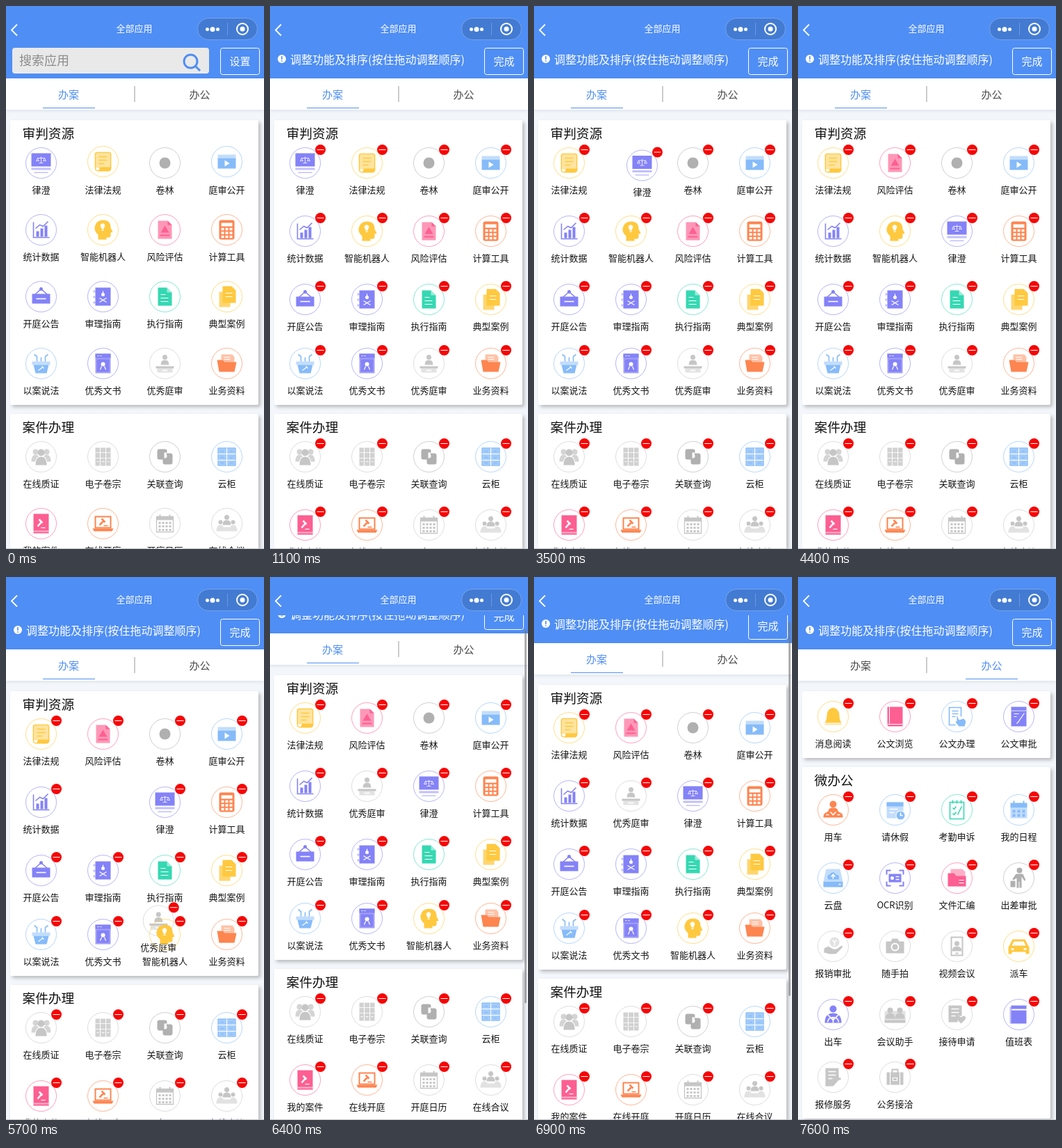
An HTML page that plays this animation: 371x780 px, repeating every 8000 ms.

```html
<!DOCTYPE html>
<html lang="zh-CN">
<head>
<meta charset="utf-8">
<title>全部应用</title>
<style>
html, body { margin: 0; width: 100%; height: 100%; overflow: hidden; background: #f3f6fa; }
svg { display: block; }
text { font-family: "Noto Sans CJK SC", "Noto Sans CJK", sans-serif; }
.mid { text-anchor: middle; }
.card { fill: #fff; filter: drop-shadow(3px 3px 2.5px rgba(0, 0, 0, .24)); }
.head { font-size: 18.7px; fill: #111; }
.label { font-size: 13px; fill: #161616; text-anchor: middle; }
.tab { font-size: 15px; fill: #4a4a4a; text-anchor: middle; }
.tab.on { fill: #4f8ef4; }
.icon { fill: currentColor; }
.ring { fill: none; stroke: currentColor; stroke-opacity: .6; }
.l { opacity: .5; }
.w, .s { fill: none; stroke: #fff; stroke-width: 1.6; }
.s { stroke: currentColor; }
.f { fill: #fff; }
.white { fill: #fff; }
</style>
</head>
<body>
<svg id="stage" width="371" height="780" viewBox="0 0 371 780">
<defs>
  <g id="badge"><circle r="7.5" fill="#f60505"/><path class="w" d="M-5 0h10" style="stroke-width:1"/></g>

  <g id="screen"><path d="M-14-14h28v19h-28z"/><path class="l" d="M-14 7h28v3h-28zM-10 13h20v1.5h-20z"/><path class="w" style="stroke-width:.8" d="M0-9v9M-5-7h10M-7-3l2-4 2 4zM3-3l2-4 2 4zM-3 0h6"/></g>
  <g id="scroll"><path class="l" d="M-12-11q0-3 3-3h18q3 0 3 3v20h-24z"/><path class="s" style="stroke-width:1.2" d="M-11-10q0-3 3-3h16q3 0 3 3v20q0 3-3 3h-16q-3 0-3-3z"/><path d="M-5 8h17q0 6-5 6h-15q3-1 3-6z"/><path class="s" d="M-6-7h12M-6-2h12M-6 3h8"/></g>
  <g id="disc"><circle r="8"/></g>
  <g id="play"><path class="l" d="M-13-10h26v5h-26z"/><path d="M-13-5h26v15h-26z"/><path class="f" d="M-3-2l7 4.500-7 4.500z"/></g>
  <g id="chart"><path d="M-7 2h4v8h-4zM-1-2h4v12h-4zM5-6h4v16h-4z"/><path class="s" d="M-11-11v22h23M-8-2l6-5 5 2 7-7"/></g>
  <g id="brain"><path d="M-7 14v-7q-6-5-5-11 2-10 12-10 11 0 11 11l3 6-3 1v4q0 3-3 3h-3v3z"/><path class="f" d="M-3-4a3.200 3.200 0 1 1 5 0l-1 3h-3zM-2 0h3v1.500h-3z"/></g>
  <g id="risk"><path class="l" style="opacity:.65" d="M-10-13h14l6 6v20h-20z"/><path d="M0-6l6 10h-12zM-7 7h14v2h-14zM4-13l6 6h-6z"/></g>
  <g id="calc"><path d="M-11-11q0-3 3-3h16q3 0 3 3v22q0 3-3 3h-16q-3 0-3-3z"/><path class="f" d="M-8-10h16v5h-16z"/><path class="w" stroke-dasharray="4 2" style="stroke-width:3.500" d="M-8-1h16M-8 4.500h16M-8 10h16"/></g>
  <g id="sign"><path class="s" d="M-9-3l9-8 9 8"/><path d="M-13-4h26v14h-26z"/><circle cy="-11" r="2.500"/><path class="w" d="M-7 3h14"/></g>
  <g id="guide"><path d="M-11-13h22v26h-22z"/><path class="l" d="M-14-9h3v3h-3zM-14-1h3v3h-3zM-14 7h3v3h-3z"/><path class="w" style="stroke-width:1.200" d="M-5 8l10-6M5 8l-10-6M0-8v7"/><circle class="f" cy="-3" r="2.500"/></g>
  <g id="paper"><path d="M-10-13h13l7 7v19h-20z"/><path class="l f" d="M3-13l7 7h-7z"/><path class="w" style="stroke-width:1.200" d="M-6-3h7M-6 2h11M-6 7h11"/></g>
  <g id="papers"><path class="l" style="opacity:.75" d="M-11-7h16v22h-16z"/><path d="M-6-15h13l6 6v18h-19z"/><path class="w" style="stroke-width:1.200" d="M-2-5h10M-2 0h10"/></g>
  <g id="podium"><path class="l" d="M-13-3h26v5h-26z"/><path d="M-11 2h22l-3 12h-16z"/><path class="s" d="M-6-3v-7l-4-3M6-3v-7l4-3M0-3v-6"/><path class="w" style="stroke-width:1.200" d="M-4 10l7-5M1 4l3 3"/></g>
  <g id="award"><path class="l" style="opacity:.75" d="M-11-14h22v28h-22z"/><path d="M-11-14h22v6h-22zM-9-6h18v18h-18z"/><circle class="f" cy="1" r="3"/><path class="w" style="stroke-width:1.200" d="M-8-11h2M-4-11h2M-2 4l-2 5M2 4l2 5"/></g>
  <g id="judge"><circle cy="-9" r="3.500"/><path d="M-6 2q0-7 6-7t6 7zM-13 4h26v3h-26z"/><path class="l" d="M-11 7h22v6h-22z"/><path class="w" d="M-4 10h8"/></g>
  <g id="folder"><path class="l" d="M-8-13h16l3 4v13h-19z"/><path d="M-14-5h8l3 3h17l-3 14h-22z"/><path class="w" style="stroke-width:1.200" d="M-4-9h9M-4-6h9"/></g>

  <g id="people"><g class="l" style="opacity:.75"><circle cx="-8" cy="-7" r="4"/><circle cx="8" cy="-7" r="4"/><path d="M-14 7q0-10 6-10t6 10zM2 7q0-10 6-10t6 10z"/></g><circle cy="-6" r="5"/><path class="f" d="M-9 12q0-13 9-13t9 13z"/><path d="M-8 12q0-12 8-12t8 12z"/></g>
  <g id="shelf"><path class="l" style="opacity:.8" d="M-11-13h6.500v26h-6.500zM-3.500-13h7v26h-7zM4.500-13h6.500v26h-6.500z"/><path class="w" d="M-11-6h22M-11 2h22" style="stroke-width:.8"/><path class="w" style="stroke-width:1" d="M-9 7h3M-2 7h4M6 7h3"/></g>
  <g id="link"><path d="M-8-11h8q3 0 3 3v9q0 3-3 3h-8q-3 0-3-3v-9q0-3 3-3z"/><path class="f" d="M-1-6h14v18h-14z"/><path d="M2-5h6q3 0 3 3v10q0 3-3 3h-8q-3 0-3-3v-6h3q3 0 3-3z"/></g>
  <g id="drawers"><path class="l" style="opacity:.75" d="M-13-13h26v26h-26z"/><path class="s" style="stroke-width:1" d="M-12.500-12.500h25v25h-25z"/><path class="w" style="stroke-width:1" d="M0-13v26M-13-4h26M-13 5h26"/><path class="s" d="M-9-8h5M4-8h5M-9 1h5M4 1h5M-9 9h5M4 9h5"/></g>
  <g id="case"><path d="M-11-14h22v28h-22z"/><path class="l f" d="M-11 10h22v2h-22z"/><path class="w" style="stroke-width:2.500" d="M-3-6l5 5M1-3l-6 7"/><path class="w" style="stroke-width:1.200" d="M0 6h6"/></g>
  <g id="laptop"><path class="s" style="stroke-width:2" d="M-11-10h22v16h-22z"/><path d="M-15 7h30l-2 4h-26z"/><path class="s" style="stroke-width:2.500" d="M-2-7l5 5M1-4l-6 6"/><path class="s" d="M1 3h6"/></g>
  <g id="calendar"><path class="s" style="stroke-width:1.300" d="M-12-10h24v22h-24z"/><path d="M-12-10h24v5h-24zM-8-13h2v5h-2zM6-13h2v5h-2z"/><path class="s" stroke-dasharray="3 2" style="stroke-width:3" d="M-9-1h18M-9 4h18M-9 9h18"/></g>
  <g id="meeting"><circle cy="-9" r="3.500"/><circle cx="-9" cy="-2" r="3"/><circle cx="9" cy="-2" r="3"/><path d="M-6 2q0-7 6-7t6 7z"/><path class="l" d="M-15 11q0-9 6-9 3 0 4 3h10q1-3 4-3 6 0 6 9z"/></g>

  <g id="bell"><path d="M-12 9q3-4 3-11 0-9 9-11 9 2 9 11 0 7 3 11z"/><path class="l" d="M-12 10h24v2h-24z"/></g>
  <g id="book"><path d="M-11-14h22v28h-20q-2 0-2-3z"/><path class="w" style="stroke-width:1" d="M-8-14v24M-11 11h22"/></g>
  <g id="handle"><path class="s" d="M6 0v-13h-17v25h9M-7-8h9M-7-4h9M-7 0h5"/><path d="M0-2l3 7 7-2 3 4-2 7h-8l-5-6 2-2z"/></g>
  <g id="approve"><path d="M-11-14h22v28h-22z"/><path class="l f" d="M-11-9h22v1.500h-22z"/><path class="w" style="stroke-width:1.200" d="M-7-4h7M-7 0h4M8-5l-9 13-2 2"/></g>
  <g id="driver"><circle cy="-8" r="5"/><path d="M-7 2q0-5 7-5t7 5l5 3q2 1 2 6h-28q0-5 2-6z"/><path class="w" d="M-10 7h4M6 7h4M-4 3l4 4 4-4"/></g>
  <g id="leave"><path class="l" d="M-12-11h24v23h-24z"/><path d="M-12-11h24v6h-24z"/><path class="w" d="M-8-1h12M-8 4h7"/><circle class="f" cx="8" cy="8" r="7"/><circle cx="8" cy="8" r="6"/><path class="w" d="M8 4v4h3"/></g>
  <g id="check"><path class="s" d="M-10-11h20v24h-20zM-6-14v5M0-14v5M6-14v5M-6-3l2 2 3-4M-6 5l2 2 3-4M7-5l-6 12"/></g>
  <g id="plan"><path class="l" d="M-12-3h24v15h-24z"/><path d="M-12-10h24v7h-24zM-8-13h2v5h-2zM6-13h2v5h-2z"/><path class="s" stroke-dasharray="4 3" style="stroke-width:4" d="M-9 2h18M-9 8h18"/></g>
  <g id="disk"><path class="l" d="M-10-13h20l4 18h-28z"/><path d="M-14 5h28v8h-28z"/><path d="M-7 2q-3-6 2-7 5-7 9 0 6 0 4 7z"/><path class="w" d="M0 1v-6M-3-2l3-3 3 3M8 9h3"/></g>
  <g id="scan"><path class="s" style="stroke-width:2" d="M-12-5v-6h6M6-11h6v6M12 5v6h-6M-6 11h-6v-6"/><path d="M-9-6h18v12h-18z"/><path class="w" d="M1-2h5M1 2h5"/><circle class="f" cx="-4" r="2.500"/></g>
  <g id="files"><path class="l" d="M-9-13h17l4 4v12h-21z"/><path d="M-13-7h9l3 4h14v15h-26z"/><path class="w" style="stroke-width:1.200" d="M3 3h7M3 7h7"/></g>
  <g id="trip"><circle cx="1" cy="-11" r="4"/><path d="M-4-6h10l4 9-2 1-4-6v16h-3v-9h-1v9h-3v-14l-5 3-1-2zM-12 4h7v9h-7z"/></g>
  <g id="pay"><circle class="l" cx="2" cy="-6" r="7"/><path d="M-13 3l6-3 7 4h5l7-5q3 1 0 4l-8 8h-9l-8-2z"/><path class="w" d="M-1-9l3 3 3-3M2-6v5"/></g>
  <g id="camera"><path d="M-13-7h7l2-4h8l2 4h7v17h-26z"/><circle class="f" cy="1" r="6"/><circle cy="1" r="4"/></g>
  <g id="phone"><path class="s" style="stroke-width:2" d="M-8-13h16v26h-16z"/><circle cy="-4" r="3.500"/><path d="M-7 7q0-7 7-7t7 7zM-2 9h4v2h-4z"/></g>
  <g id="car"><path d="M-9-10h18l4 8 2 3v10h-5v-3h-20v3h-5v-10l2-3z"/><path class="f" d="M-7-7h14l3 6h-20z"/><path class="w" style="stroke-width:2.500" d="M-11 4h4M7 4h4"/></g>
  <g id="wheel"><circle cy="-8" r="5"/><path d="M-12 12q0-14 12-14t12 14z"/><path class="w" d="M-8 11q1-7 8-7t8 7M0 4v8M-9-1l9 9 9-9"/></g>
  <g id="host"><path class="l" d="M-15-5h30v15h-30z"/><circle cx="-7" cy="-6" r="4"/><circle cx="7" cy="-6" r="4"/><path d="M-14 6q0-8 7-8t7 8q0-8 7-8t7 8zM-15 8h30v4h-30z"/></g>
  <g id="care"><path d="M-12-13h19v15h-6v9h-13z"/><path class="w" d="M-8-8h11M-8-3h11M-8 2h6"/><path d="M6 13l-6-6q-2-5 3-5l3 2 3-2q5 0 3 5z"/></g>
  <g id="duty"><path d="M-11-13h22v5h-22z"/><path class="l" d="M-13-11h3v24h-3z"/><path d="M-11-6h22v19h-22z"/></g>
  <g id="repair"><path d="M-11-13h19v14l-9 12h-10z"/><path class="w" d="M-7-8h11M-7-3h11M-7 2h6"/><path class="s" style="stroke-width:3" d="M-1 12l8-9 4-1M7 3l0-4"/></g>
  <g id="bag"><path class="s" style="stroke-width:2" d="M-4-6v-5h8v5"/><path d="M-12-7h24v18h-24z"/><path class="w" style="stroke-width:1.200" d="M-7-7v18M7-7v18M-3 5v-4h6v4z"/></g>
</defs>

<rect width="371" height="780" fill="#f3f6fa"/>
<g id="page">
  <rect y="-10" width="371" height="114" fill="#4f8ef4"/>
  <g id="search">
    <rect x="9" y="60" width="283" height="37" rx="4" fill="#e9e9ea"/>
    <text x="19" y="85" font-size="18" fill="#8c8c8c">搜索应用</text>
    <g fill="none" stroke="#4f8ef4" stroke-width="3"><circle cx="265.500" cy="79.500" r="9.500"/><path d="M272 86l7 7"/></g>
  </g>
  <g id="hint">
    <circle cx="17" cy="76" r="6" class="white"/>
    <path d="M16.200 72h1.600v5h-1.600zM16.200 78.200h1.600v1.600h-1.600z" fill="#4f8ef4"/>
    <text x="29" y="83" font-size="16" font-weight="500" class="white">调整功能及排序(按住拖动调整顺序)</text>
  </g>
  <rect x="308.500" y="60.500" width="56" height="38" rx="3" fill="none" stroke="#fff"/>
  <text id="action" class="white mid" x="336.500" y="85" font-size="15"></text>
  <rect y="104" width="371" height="45" fill="#fff" style="filter:drop-shadow(0 2px 2px rgba(60,80,120,.1))"/>
  <path d="M185 115v23" stroke="#bbb" stroke-width="1.500"/>
  <text class="tab" x="90" y="132.500">办案</text>
  <text class="tab" x="278.500" y="132.500">办公</text>
  <path id="line" d="M53 146.500h75" stroke="#4f8ef4"/>
  <g id="cases"></g>
  <g id="office"></g>
</g>

<rect width="371" height="55" fill="#4f8ef4"/>
<path d="M16 26.500l-8 8 8 8" fill="none" stroke="#fff" stroke-width="1.800"/>
<text class="white mid" x="184.500" y="37" font-size="13" font-weight="500">全部应用</text>
<rect x="275.500" y="17.500" width="86" height="31" rx="15.500" fill="#437bd2" stroke="#75a3ec"/>
<path d="M318.500 24v18" stroke="#6d99e0"/>
<g class="white"><circle cx="289.500" cy="33.500" r="2.500"/><circle cx="297" cy="33.500" r="3.500"/><circle cx="304.500" cy="33.500" r="2.500"/><circle cx="340" cy="33" r="3.500"/></g>
<circle cx="340" cy="33" r="8" fill="none" stroke="#fff" stroke-width="2"/>
<rect id="bar" x="366" y="58" width="3" height="537" rx="1.500" fill="#777" fill-opacity=".6"/>
<path d="M0 779.500h371" stroke="#c4c6c8"/>
</svg>

<script>
const $ = id => document.getElementById(id);
const NS = 'http://www.w3.org/2000/svg';
const colors = {
  violet: '#8482f7', amber: '#ffc93f', gray: '#c6c6c6', dark: '#b0b0b0', blue: '#86bbf9',
  pink: '#fd5f92', orange: '#fd8550', green: '#35d8b2'
};
const columns = [50.5, 139.5, 228.5, 317.5];

function addCard(parent, top, height, title) {
  parent.insertAdjacentHTML('beforeend',
    `<rect class="card" x="6" y="${top}" width="357" height="${height}" rx="2"/>` +
    (title ? `<text class="head" x="23.500" y="${top + 26}">${title}</text>` : ''));
}

function addTiles(parent, list) {
  return list.trim().split(/\s+/).map(entry => {
    const [icon, color, label] = entry.split(':');
    const el = document.createElementNS(NS, 'g');
    el.innerHTML =
      `<g class="icon" style="color:${colors[color]}"><circle class="ring" r="22"/><use href="#${icon}"/></g>` +
      `<text class="label" y="43.500">${label}</text><use class="badge" href="#badge" x="22" y="-19"/>`;
    parent.append(el);
    return el;
  });
}

const move = (el, x, y) => el.setAttribute('transform', `translate(${x} ${y})`);
const show = (el, on) => { el.style.display = on ? '' : 'none'; };

addCard($('cases'), 164, 409, '审判资源');
addCard($('cases'), 586, 420, '案件办理');
const trial = addTiles($('cases'), `
  screen:violet:律澄 scroll:amber:法律法规 disc:dark:卷林 play:blue:庭审公开
  chart:violet:统计数据 brain:amber:智能机器人 risk:pink:风险评估 calc:orange:计算工具
  sign:violet:开庭公告 guide:violet:审理指南 paper:green:执行指南 papers:amber:典型案例
  podium:blue:以案说法 award:violet:优秀文书 judge:gray:优秀庭审 folder:orange:业务资料`);
const work = addTiles($('cases'), `
  people:gray:在线质证 shelf:gray:电子卷宗 link:dark:关联查询 drawers:blue:云柜
  case:pink:我的案件 laptop:orange:在线开庭 calendar:gray:开庭日历 meeting:gray:在线合议`);
trial[5].parentNode.append(trial[5]);

addCard($('office'), 164, 96);
addCard($('office'), 273, 505, '微办公');
const officeRows = [200.5, 334.5, 432.5, 530.5, 628.5, 718.5];
addTiles($('office'), `
  bell:amber:消息阅读 book:pink:公文浏览 handle:blue:公文办理 approve:violet:公文审批
  driver:orange:用车 leave:blue:请休假 check:green:考勤申诉 plan:blue:我的日程
  disk:blue:云盘 scan:violet:OCR识别 files:pink:文件汇编 trip:dark:出差审批
  pay:gray:报销审批 camera:gray:随手拍 phone:gray:视频会议 car:amber:派车
  wheel:violet:出车 host:gray:会议助手 care:gray:接待申请 duty:violet:值班表
  repair:gray:报修服务 bag:gray:公务接洽`)
  .forEach((el, i) => move(el, columns[i % 4], officeRows[i >> 2]));

// Tile a is dragged onto tile b, which then glides back to the free slot.
const drags = [
  { a: 0, b: 1, start: 1800, drop: 2200, end: 2700, over: [5, 3], bow: 0 },
  { a: 0, b: 6, start: 3400, drop: 3900, end: 4300, over: [0, 0], bow: 18 },
  { a: 5, b: 14, start: 4800, drop: 5600, end: 6100, over: [5, 0], bow: 0 }
];
const scrolls = { 6400: 23, 6500: 34, 6600: 36, 6700: 36, 6800: 24, 6900: 9 };
const smooth = (t, from, to) => {
  const p = Math.min(1, Math.max(0, (t - from) / (to - from)));
  return p * p * (3 - 2 * p);
};
const mix = (p, q, k) => p.map((v, i) => v + (q[i] - v) * k);
const slot = (i, edit) => {
  const row = i >> 2;
  return [columns[i % 4], 225.5 + (edit ? 98 * row - (row === 3 ? 6 : 0) : 96 * row)];
};

function placeTrial(t, edit) {
  const order = trial.map((_, i) => i);
  const spots = order.map(i => slot(i, edit));
  for (const { a, b, start, drop, end, over, bow } of drags) {
    if (t < start) break;
    const home = slot(order[a], edit), goal = slot(order[b], edit);
    const k = smooth(t, start, drop), lift = bow * 4 * k * (1 - k);
    const [x, y] = mix(home, goal.map((v, i) => v + over[i]), k);
    spots[a] = t <= drop ? [x + lift, y - lift] : goal;
    spots[b] = mix(goal, home, smooth(t, drop, end));
    [order[a], order[b]] = [order[b], order[a]];
  }
  trial.forEach((el, i) => {
    move(el, ...spots[i]);
    move(el.firstChild, 0, !edit && i < 4 && i % 2 ? -2 : 0);
  });
}

function draw(t) {
  const edit = t >= 1100, second = t >= 7500, y = scrolls[t] || 0;
  placeTrial(t, edit);
  work.forEach((el, i) => move(el, columns[i % 4], 647.5 + (i >> 2) * (edit ? 98 : 96)));
  document.querySelectorAll('#cases .badge').forEach(el => show(el, edit));
  show($('search'), !edit);
  show($('hint'), edit);
  show($('cases'), !second);
  show($('office'), second);
  $('action').textContent = edit ? '完成' : '设置';
  document.querySelectorAll('.tab').forEach((el, i) => el.classList.toggle('on', i === +second));
  move($('line'), second ? 188 : 0, 0);
  move($('page'), 0, -y);
  move($('bar'), 0, y * .745);
  $('bar').style.opacity = t < 6400 ? 0 : Math.min(1, Math.max(0, (7500 - t) / 300));
}

const began = performance.now();
let last = -1;
function tick() {
  const t = Math.floor((performance.now() - began) % 8000 / 100) * 100;
  if (t !== last) draw(last = t);
  requestAnimationFrame(tick);
}
tick();
</script>
</body>
</html>
```
